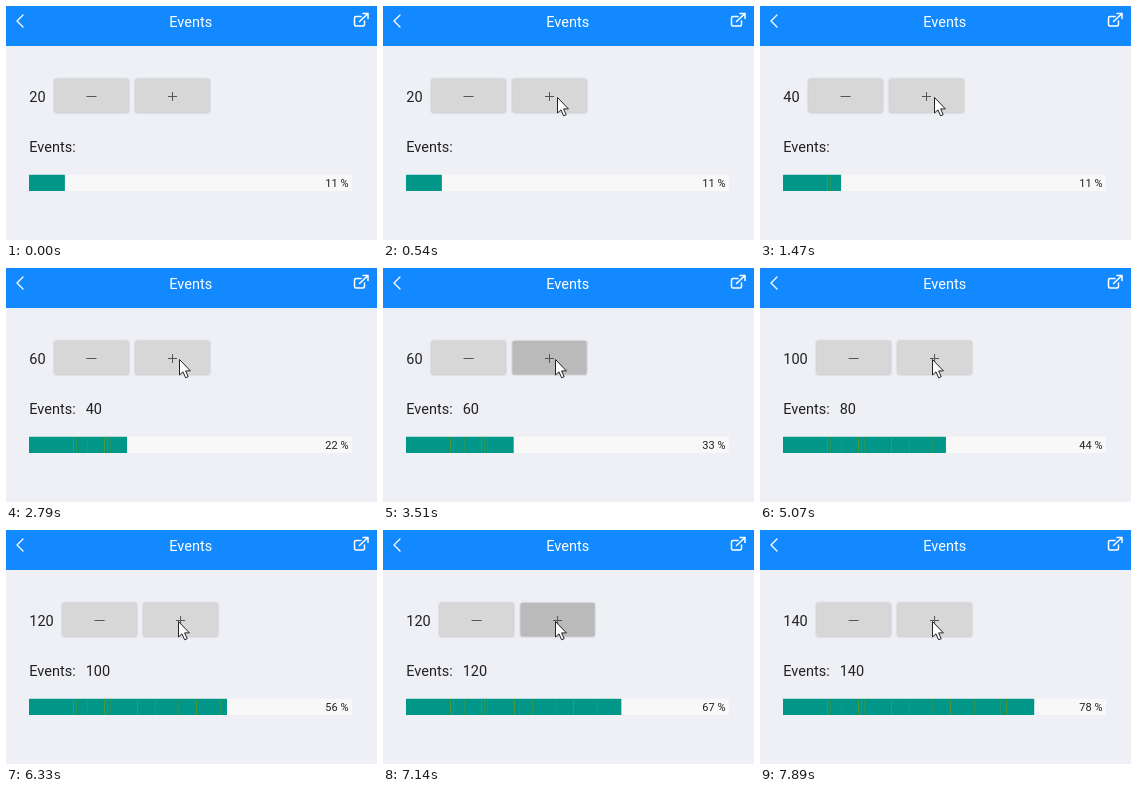
An HTML page for the animation above (8000 ms loop, 371 by 234 pixels).

```html
<!DOCTYPE html>
<html lang="en">
<head>
<meta charset="utf-8">
<title>Events</title>
<style>
  html, body { margin: 0; width: 100%; height: 100%; overflow: hidden; background: #eff0f5; }
  svg { display: block; width: 371px; height: 234px; font: 14.5px Roboto, sans-serif; fill: #212121; }
  .button rect { fill: #d6d7d6; filter: drop-shadow(0 .6px .8px #0004); }
  .button path { stroke: #555; }
  .icon { fill: none; stroke: #fff; stroke-linecap: round; stroke-linejoin: round; }
</style>
</head>
<body>
<svg viewBox="0 0 371 234">
  <defs>
    <clipPath id="face"><rect x="129.5" y="73" width="74" height="33.5" rx="1.5"/></clipPath>
    <clipPath id="filled"><rect id="fill" x="23" y="168.5" height="16.5"/></clipPath>
  </defs>
  <rect width="371" height="234" fill="#eff0f5"/>
  <rect width="371" height="40" fill="#1389ff"/>
  <path class="icon" stroke-width="1.3" d="M17 9l-6 6 6 6"/>
  <path class="icon" stroke-width="1.5" d="M355 10.5h-5q-1.5 0-1.5 1.5v6.5q0 1.5 1.5 1.5h7q1.5 0 1.5-1.5V15M353.500 15.500l8-7.500m-4.500-.500h5v5"/>
  <text x="184.700" y="20.500" text-anchor="middle" fill="#fff">Events</text>

  <text id="count" x="23.300" y="95.500"></text>
  <g id="buttons">
    <g class="button">
      <rect x="48.500" y="73" width="74" height="33.500" rx="1.500"/>
      <path d="M80.500 90.500h10"/>
    </g>
    <g class="button">
      <rect x="129.500" y="73" width="74" height="33.500" rx="1.500"/>
      <g clip-path="url(#face)"><circle id="ripple" cx="173" cy="91"/></g>
      <path d="M162 90.500h9M166.500 86v9"/>
    </g>
  </g>

  <text x="23.300" y="146">Events:</text>
  <text id="events" x="79.700" y="146"></text>

  <rect x="23" y="168.500" width="323" height="16.500" fill="#f8f8f8"/>
  <g clip-path="url(#filled)">
    <rect x="23" y="168.500" width="323" height="16.500" fill="#009688"/>
    <g id="streaks" fill="#5c9a2e"></g>
  </g>
  <text id="percent" x="342.500" y="180.500" text-anchor="end" font-size="11"></text>

  <path id="cursor" fill="#fff" stroke="#222" d="M.5.5v15.500l3.500-3.200 2.600 6 2.600-1.100-2.600-5.800h4.800z"/>
</svg>
<script>
const LOOP = 8000, GROW = 650, BAR = 323, STEPS = 18;
// Each tap: press, end of bar growth, update of the labels (ms)
const taps = [
  [1050, 1720, 1770], [2160, 2965, 2970], [3360, 4180, 4200],
  [4590, 5370, 5400], [5850, 6645, 6690], [6990, 7805, 7830]
];
const $ = id => document.getElementById(id);
const clamp = v => Math.max(0, Math.min(1, v));
const set = (id, attrs) => {
  for (const name in attrs) $(id).setAttribute(name, attrs[name]);
};

$('streaks').innerHTML = [67, 70, 81, 98, 101, 104, 131, 149, 172, 190, 214, 240, 246]
  .map((x, i) => `<rect x="${x}" y="168.500" width="1" height="16.500" opacity="${[.8, .5, .4][i % 3]}"/>`)
  .join('');

function cursorAt(t) {
  const u = 1 - (1 - clamp((t - 90) / 450)) ** 2, v = 1 - u;
  const curve = (a, b, c) => v * v * a + 2 * v * u * b + u * u * c;
  const drift = (t >= 1980) + (t >= 3360);
  return [curve(118, 156, 174) - drift, curve(232, 140, 91)];
}

function draw(t) {
  let bar = 1, clicks = 1, shown = 1, ripple = 0, radius = 0;
  for (const [press, end, update] of taps) {
    const start = end - GROW;
    bar += clamp((t - start) / GROW);
    clicks += t >= start;
    shown += t >= update;
    const age = t - press;
    if (age >= 0 && age < 400) {
      ripple = .16 * clamp(age / 60) * clamp((400 - age) / 240);
      radius = 12 + 52 * clamp(age / 200);
    }
  }
  const count = clicks * 20;
  $('count').textContent = count;
  $('events').textContent = shown > 1 ? shown * 20 : '';
  $('percent').textContent = Math.round(shown * 2 / STEPS * 100) + ' %';
  set('buttons', { transform: `translate(${count >= 100 ? 8.1 : 0})` });
  set('ripple', { r: radius, opacity: ripple });
  set('fill', { width: BAR * bar * 2 / STEPS });
  set('cursor', {
    transform: `translate(${cursorAt(t)})`,
    visibility: t < 120 ? 'hidden' : 'visible'
  });
}

function tick() {
  draw(performance.now() % LOOP);
  requestAnimationFrame(tick);
}
tick();
</script>
</body>
</html>
```
